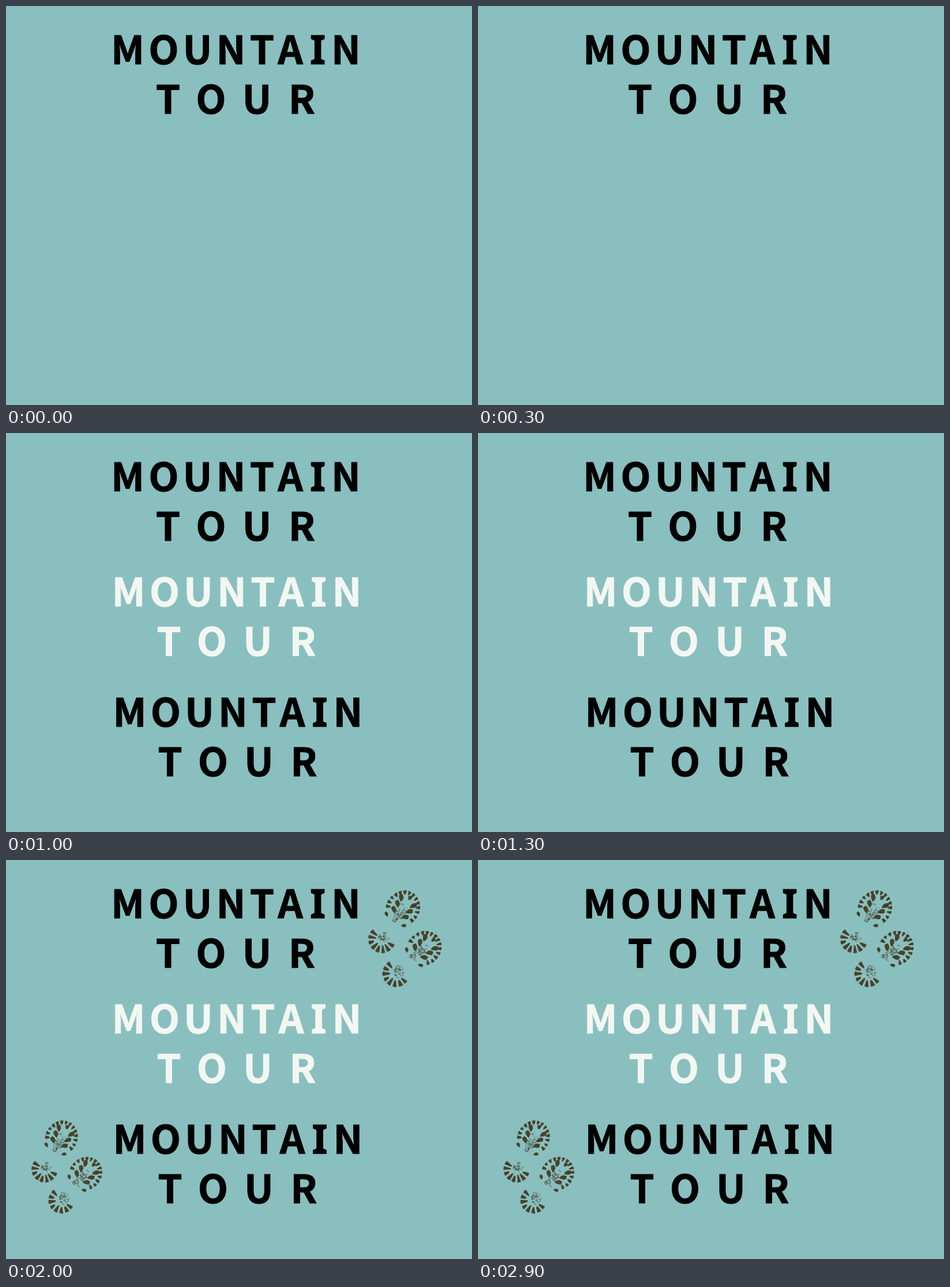
An HTML page with a canvas that plays this animation: 808x693 px, repeating every 3500 ms.

```html
<!DOCTYPE html>
<html lang="en">
<head>
<meta charset="utf-8">
<title>Mountain Tour</title>
<style>
  html, body { margin: 0; width: 100%; height: 100%; overflow: hidden; background: #89bfbf; }
  canvas { display: block; }
</style>
</head>
<body>
<canvas id="stage" width="808" height="693"></canvas>
<script>
const ctx = document.getElementById('stage').getContext('2d');
const LOOP = 3500, STEP = 500;
const TEAL = '#89bfbf', BLACK = '#000', CREAM = '#f3f7f2', MUD = '#48422a';
const TAU = Math.PI * 2, DEG = Math.PI / 180;
const SANS = '700 68px "Noto Sans CJK JP", "Noto Sans CJK SC", "Noto Sans", sans-serif';
const SLAB = '700 70px "Noto Sans", sans-serif'; // its capital I has serifs

// Each line is set letter by letter on its optical centres.
const LINES = [
  { text: 'MOUNTAIN', y: 100.5, at: [211, 273.5, 332, 390, 444, 493, 540.5, 589.5] },
  { text: 'TOUR', y: 187, at: [281, 355.5, 435, 513] }
];

function title(dx, dy, color) {
  ctx.fillStyle = ctx.strokeStyle = color;
  ctx.lineWidth = 1;
  ctx.textAlign = 'center';
  for (const { text, y, at } of LINES) {
    at.forEach((x, i) => {
      ctx.font = text[i] === 'I' ? SLAB : SANS;
      ctx.fillText(text[i], x + dx, y + dy);
      ctx.strokeText(text[i], x + dx, y + dy);
    });
  }
}

function random(seed) {
  return () => {
    seed = (seed * 16807) % 2147483647;
    return seed / 2147483647;
  };
}

// Ring of separate rubber lugs between two angles.
function ring(cx, cy, rx, ry, from, to, count, depth, rnd) {
  const span = (to - from) / count;
  for (let i = 0; i < count; i++) {
    const a = (from + span * (i + 0.08 + rnd() * 0.1)) * DEG;
    const b = (from + span * (i + 0.76 + rnd() * 0.1)) * DEG;
    const inner = 1 - depth * (0.75 + rnd() * 0.5);
    const point = (t, k) => ctx.lineTo(cx + Math.cos(t) * rx * k, cy + Math.sin(t) * ry * k);
    ctx.beginPath();
    point(a, 0.95 + rnd() * 0.05);
    point((a + b) / 2, 1);
    point(b, 0.95 + rnd() * 0.05);
    point(b - 0.03, inner + 0.05);
    point((a + b) / 2 + (rnd() - 0.5) * 0.12, inner - 0.04);
    point(a + 0.04, inner);
    ctx.fill();
  }
}

function leaf(x, y, length, width, angle) {
  ctx.save();
  ctx.translate(x, y);
  ctx.rotate(angle * DEG);
  ctx.beginPath();
  ctx.moveTo(-length / 2, width * 0.2);
  ctx.quadraticCurveTo(-length * 0.1, -width, length / 2, -width * 0.35);
  ctx.lineTo(length * 0.42, width * 0.4);
  ctx.quadraticCurveTo(0, width * 0.65, -length / 2, width * 0.2);
  ctx.fill();
  ctx.restore();
}

// Fine broken marks where the arch barely touches the ground.
function scuffs(cx, cy, w, h, count, rnd) {
  ctx.lineWidth = 0.7;
  for (let i = 0; i < count; i++) {
    const x = cx + (rnd() - 0.5) * w, y = cy + (rnd() - 0.5) * h;
    ctx.beginPath();
    ctx.arc(x, y, 1 + rnd() * 2.6, rnd() * TAU, rnd() * TAU);
    ctx.stroke();
  }
}

function boot(x, y, angle, side, seed) {
  const rnd = random(seed);
  ctx.save();
  ctx.translate(x, y);
  ctx.rotate(angle * DEG);
  ctx.scale(side, 1);

  ring(0, -31, 28, 31, -205, 33, 14, 0.22, rnd);
  for (const s of [-1, 1]) {
    for (let i = 0; i < 3; i++) {
      leaf(s * (12 - i * 0.5), -44 + i * 11.5, s * 13, 7, s * -(50 - i * 10));
    }
    leaf(s * 17, -8, s * 9, 5, s * -25);
  }
  leaf(0, -52, 8, 6, -70);
  scuffs(0, -21, 12, 32, 26, rnd);

  ring(0, 31, 23, 23, -18, 198, 8, 0.46, rnd);
  scuffs(0, 26, 18, 15, 22, rnd);
  ctx.restore();
}

function prints(x, y, scale, angle) {
  ctx.save();
  ctx.translate(x, y);
  ctx.rotate(angle * DEG);
  ctx.scale(scale, scale);
  ctx.fillStyle = ctx.strokeStyle = MUD;
  boot(-17, -29, 28, -1, 71);
  boot(18.5, 29, 42, 1, 193);
  ctx.restore();
}

const scenes = [
  () => title(0, 0, BLACK),
  () => title(1.5, 200, CREAM),
  () => title(3.5, 409, BLACK),
  () => prints(98.5, 539, 1, 0),
  () => prints(684.5, 143, 1.045, 6)
];

const start = performance.now();

function frame() {
  const t = (performance.now() - start) % LOOP;
  const shown = Math.min(scenes.length, Math.floor(t / STEP) + 1);
  ctx.fillStyle = TEAL;
  ctx.fillRect(0, 0, 808, 693);
  scenes.slice(0, shown).forEach(draw => draw());
  requestAnimationFrame(frame);
}
frame();
</script>
</body>
</html>
```
